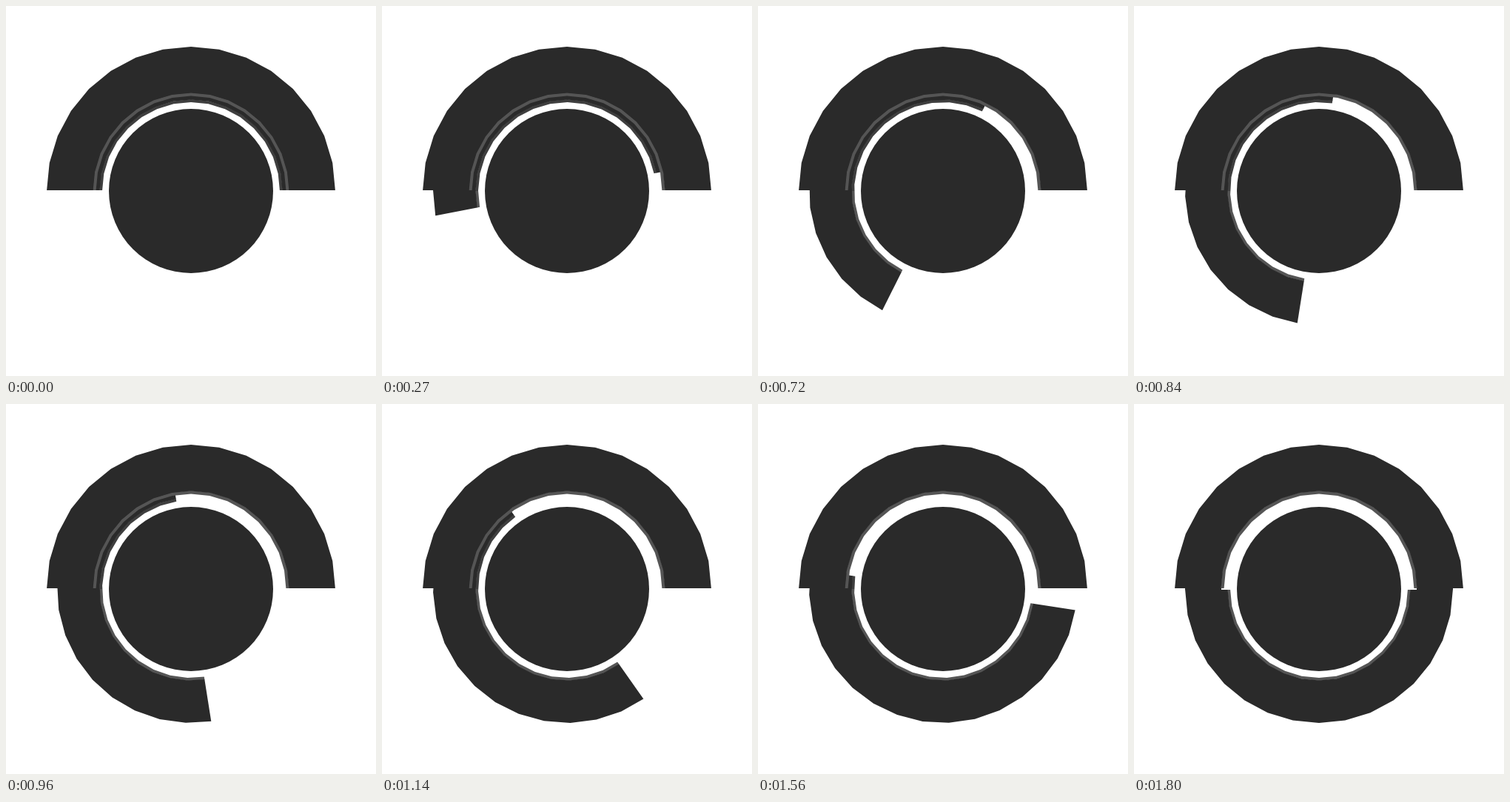
Write an HTML page with a canvas that moves like this. It is 500 px wide and 500 px high and loops after 1.83 s.

```html
<!DOCTYPE html>
<html lang="en">
<head>
<meta charset="utf-8">
<title>Turning half ring</title>
<style>
html, body { margin: 0; width: 100%; height: 100%; overflow: hidden; background: #fff; }
canvas { display: block; width: 500px; height: 500px; }
</style>
</head>
<body>
<canvas id="stage" width="500" height="500"></canvas>
<script>
const ctx = document.getElementById("stage").getContext("2d");
const LOOP = 1830, STEP = 30, TURN = 1800;
const DARK = "#2a2a2a", WALL = "#555555", SHADE = "#3f3f3f";
const SIDES = 16;

// Faceted upper half ring around the origin.
function halfRing(inner, outer, color) {
  ctx.beginPath();
  for (let i = 0; i <= SIDES; i++) {
    const a = Math.PI * (1 + i / SIDES);
    ctx.lineTo(outer * Math.cos(a), outer * Math.sin(a));
  }
  for (let i = SIDES; i >= 0; i--) {
    const a = Math.PI * (1 + i / SIDES);
    ctx.lineTo(inner * Math.cos(a), inner * Math.sin(a));
  }
  ctx.closePath();
  ctx.fillStyle = color;
  ctx.fill();
}

function clipRows(top, bottom) {
  ctx.beginPath();
  ctx.rect(-250, top, 500, bottom - top);
  ctx.clip();
}

function movingRing(turn, top, bottom, wall) {
  ctx.save();
  clipRows(top, bottom);
  ctx.rotate(turn);
  clipRows(-250, -1);
  halfRing(120, 124, wall);
  halfRing(123.5, 181, DARK);
  ctx.restore();
}

function fixedRing() {
  ctx.save();
  clipRows(-250, -1);
  halfRing(128.5, 133, WALL);
  halfRing(132.5, 195, DARK);
  ctx.restore();
}

function draw(time) {
  const t = Math.floor((time % LOOP) / STEP) * STEP;
  const p = Math.min(1, t / TURN);
  const turn = -Math.PI * p * p * (3 - 2 * p);

  ctx.setTransform(1, 0, 0, 1, 0, 0);
  ctx.fillStyle = "#fff";
  ctx.fillRect(0, 0, 500, 500);
  ctx.translate(250, 250);

  // Above the middle the moving ring lies in the shadow of the fixed one.
  movingRing(turn, -250, 0, SHADE);
  movingRing(turn, 0, 250, WALL);
  fixedRing();

  // The two halves meet at the end of the turn.
  ctx.fillStyle = DARK;
  if (p === 1) {
    ctx.fillRect(-181, -1, 49, 2);
    ctx.fillRect(132, -1, 49, 2);
  }

  ctx.beginPath();
  ctx.arc(0, 0, 111, 0, Math.PI * 2);
  ctx.fill();
}

const start = performance.now();
function tick() {
  draw(performance.now() - start);
  requestAnimationFrame(tick);
}
tick();
</script>
</body>
</html>
```
